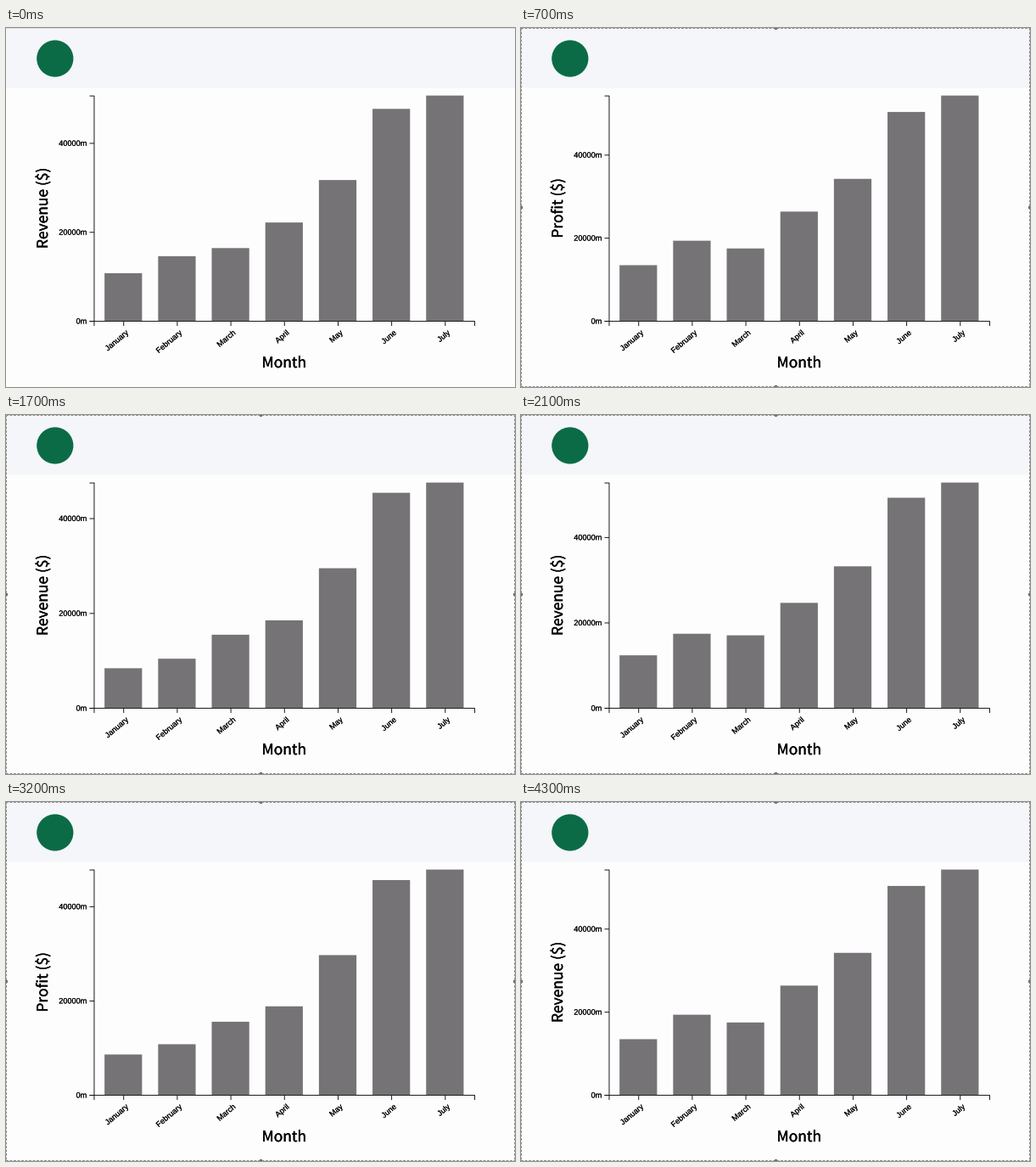
These frames come from a looping animation (600x423 px, 4400 ms). A matplotlib script:

```python
import matplotlib.pyplot as plt
import numpy as np
from matplotlib import patheffects
from matplotlib.animation import FuncAnimation
from matplotlib.patches import Circle, Rectangle

W, H, DPI = 600, 423, 72          # at 72 dpi one point is one pixel
FRAMES, INTERVAL = 44, 100
SWITCH, PERIOD, DURATION = 625, 1000, 750
BORDER_FROM = 700

SCALE = 0.9155                    # chart units to pixels
X0, BASE = 103.5, 345.1           # chart origin in pixels
CHART_W, CHART_H = 490, 290
STEP = CHART_W / 7.1              # band scale: inner padding .3, outer .2
BAND = 0.7 * STEP

MONTHS = ["January", "February", "March", "April", "May", "June", "July"]
REVENUE = np.array([13432, 19342, 17443, 26342, 34213, 50321, 54273])
PROFIT = np.array([8342, 10342, 15423, 18432, 29434, 45343, 47492])
TICKS = np.array([0, 20000, 40000])
INK = "#0c0c0e"
SMALL = dict(family="Liberation Sans", fontsize=10 * SCALE)
LARGE = dict(family="Noto Sans CJK JP", fontsize=19 * SCALE)

plt.rcParams.update({"text.hinting": "none", "toolbar": "None"})

fig = plt.figure(figsize=(W / DPI, H / DPI), dpi=DPI, facecolor="#fefdfe")
ax = fig.add_axes([0, 0, 1, 1])
ax.set(xlim=(0, W), ylim=(H, 0))
ax.axis("off")


def px(x, y):
    """Chart units (y up from the baseline) to stage pixels."""
    return X0 + x * SCALE, BASE - y * SCALE


def stroke(points):
    xs, ys = zip(*(px(x + 0.5, y - 0.5) for x, y in points))
    return ax.plot(xs, ys, color=INK, lw=0.95, snap=False, zorder=3,
                   solid_capstyle="butt", solid_joinstyle="miter")[0]


def label(x, y, text, style, weight=0.1, **kw):
    # Outlined glyphs keep their exact sub-pixel positions
    outline = patheffects.withStroke(linewidth=weight, foreground="black")
    return ax.text(x, y, text, color="black", va="baseline",
                   rotation_mode="anchor", path_effects=[outline],
                   **style, **kw)


def box(x, y, w, h, color, **kw):
    return ax.add_patch(Rectangle((x, y), w, h, fc=color, ec="none", **kw))


# Header
box(0, 0, W, 70.5, "#f4f6f9", snap=False)
top_line = box(0, 0, W, 1, "#dddfe2")
ax.add_patch(Circle((57.8, 36), 21.6, fc="#0c6b47", ec="none"))

# Selection border with a handle in the middle of each side
border = [ax.plot(xs, ys, color="#8f9092", lw=1, dashes=(3, 1.5),
                  dash_capstyle="butt", snap=False, zorder=5)[0]
          for xs, ys in [((0, W), (0.5, 0.5)), ((0, W), (H - 0.5, H - 0.5)),
                         ((0.5, 0.5), (0, H)), ((W - 0.5, W - 0.5), (0, H))]]
border += [box(x, y, w, h, "#6f7072", zorder=6)
           for x, y, w, h in [(299, 0, 3, 2), (299, H - 2, 3, 2),
                              (0, 210, 2, 3), (W - 2, 210, 2, 3)]]

# Axes
stroke([(-6, 0), (0, 0), (0, CHART_H), (-6, CHART_H)])
stroke([(0, -6), (0, 0), (CHART_W, 0), (CHART_W, -6)])

# Bars and month names
bars = []
tilt = np.radians(40)
for i, month in enumerate(MONTHS):
    left = 0.2 * STEP + i * STEP
    mid = left + BAND / 2
    bars.append(box(px(left, 0)[0], BASE, BAND * SCALE, 0, "#757375",
                    snap=False, zorder=2))
    stroke([(mid, 0), (mid, -6)])
    dx = -5 * np.cos(tilt) + 17.1 * np.sin(tilt)
    dy = 5 * np.sin(tilt) + 17.1 * np.cos(tilt)
    label(*px(mid + dx, -dy), month, SMALL, ha="right", rotation=40)

tick_lines = [stroke([(-6, 0), (0, 0)]) for _ in TICKS]
tick_texts = [label(px(-9, 0)[0], BASE, f"{v}m", SMALL, ha="right")
              for v in TICKS]

label(*px(CHART_W / 2, -60), "Month", LARGE, 0.3, ha="center")
title = label(*px(-59.5, CHART_H / 2), "", LARGE, 0.3, ha="center", rotation=90)


def cubic_in_out(x):
    return 4 * x ** 3 if x < 0.5 else 1 - 4 * (1 - x) ** 3


def update(frame):
    t = frame * INTERVAL
    turn, elapsed = divmod(t - SWITCH, PERIOD)
    k = cubic_in_out(min(elapsed / DURATION, 1))
    to_profit = turn % 2 == 0
    old, new = (REVENUE, PROFIT) if to_profit else (PROFIT, REVENUE)

    def blend(a, b):
        return CHART_H * ((1 - k) * a / old.max() + k * b / new.max())

    for bar, height in zip(bars, blend(old, new)):
        bar.set_y(BASE - height * SCALE)
        bar.set_height(height * SCALE)
    for line, text, height in zip(tick_lines, tick_texts, blend(TICKS, TICKS)):
        y = px(0, height - 0.5)[1]
        line.set_ydata([y, y])
        text.set_y(y + 3.2 * SCALE)

    title.set_text("Profit ($)" if to_profit else "Revenue ($)")
    selected = t >= BORDER_FROM
    top_line.set_visible(not selected)
    for part in border:
        part.set_visible(selected)
    return []


anim = FuncAnimation(fig, update, frames=FRAMES, interval=INTERVAL,
                     repeat=True, repeat_delay=0, blit=False)
plt.show()
```
